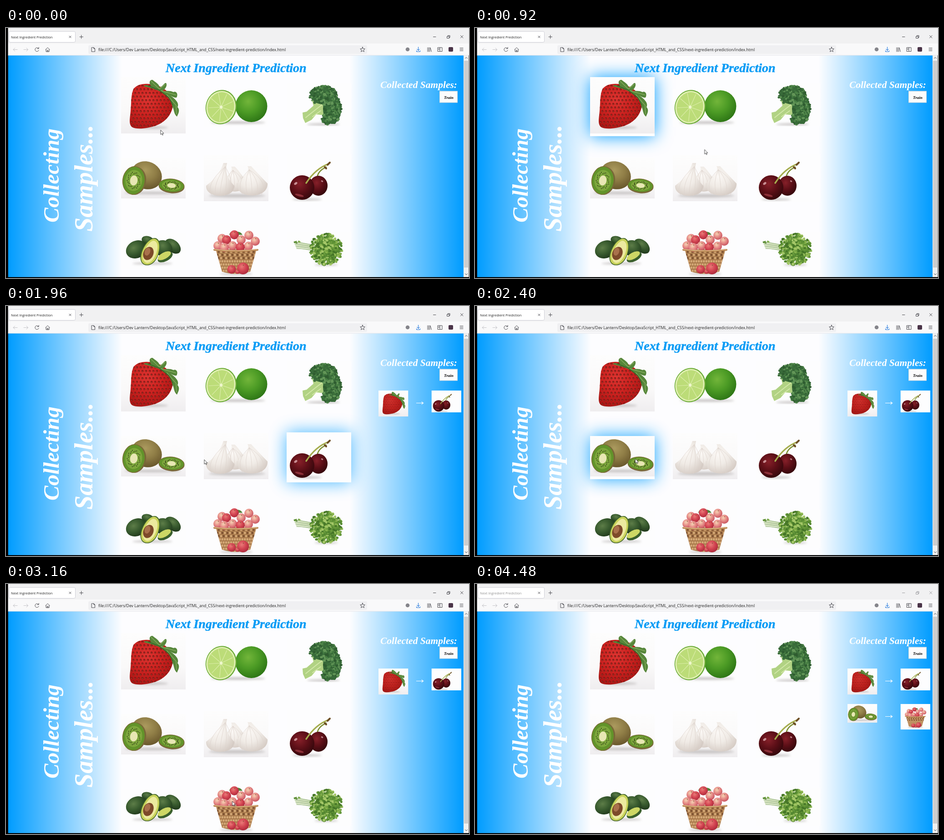
An HTML page that plays this animation: 1018x550 px, repeating every 4.52 s.

```html
<!DOCTYPE html>
<html lang="en">
<head>
<meta charset="utf-8">
<title>Next Ingredient Prediction</title>
<style>
  html, body { margin: 0; width: 100%; height: 100%; overflow: hidden; background: #000; }
  svg { display: block; }
  .ui { font-family: 'Open Sans', sans-serif; fill: #222; }
  .script { font: italic bold 28px 'Liberation Serif', serif; fill: #fff; }
  .icon { fill: none; stroke: #4a4a50; stroke-width: 1; stroke-linecap: round; stroke-linejoin: round; }
  .pale { stroke: #c4c4c8; }
</style>
</head>
<body>
<svg id="stage" width="1018" height="550" viewBox="0 0 1018 550"></svg>
<script>
const LOOP = 4520;
const stage = document.getElementById('stage');

let seed = 7;
const rand = () => (seed = (seed * 16807) % 2147483647) / 2147483647;
const repeat = (n, fn) => Array.from({ length: n }, (_, i) => fn(i)).join('');

const oval = (x, y, rx, ry, fill, turn = 0, more = '') =>
  `<ellipse cx="${x}" cy="${y}" rx="${rx}" ry="${ry}" fill="${fill}" transform="rotate(${turn} ${x} ${y})" ${more}/>`;
const shape = (d, fill, more = '') => `<path d="${d}" fill="${fill}" ${more}/>`;
const line = (d, color, width = 1) =>
  `<path d="${d}" fill="none" stroke="${color}" stroke-width="${width}" stroke-linecap="round"/>`;
const rect = (x, y, w, h, fill, more = '') =>
  `<rect x="${x}" y="${y}" width="${w}" height="${h}" fill="${fill}" ${more}/>`;
const shade = (id, ...colors) =>
  `<radialGradient id="${id}" cx=".4" cy=".35" r=".7">${colors.map((c, i) =>
    `<stop offset="${i / (colors.length - 1)}" stop-color="${c}"/>`).join('')}</radialGradient>`;

// Fills an ellipse with small random leaf clumps.
const clumps = (x, y, rx, ry, count, size, colors) => repeat(count, i => {
  const a = rand() * Math.PI * 2, d = Math.sqrt(rand());
  return oval((x + Math.cos(a) * d * rx).toFixed(1), (y + Math.sin(a) * d * ry).toFixed(1),
    (size * (.6 + rand() * .6)).toFixed(1), (size * (.5 + rand() * .5)).toFixed(1), colors[i % colors.length]);
});

const defs = `
  <linearGradient id="sky">
    <stop offset="0" stop-color="#009cff"/><stop offset=".25" stop-color="#fdfdff"/>
    <stop offset=".75" stop-color="#fdfdff"/><stop offset="1" stop-color="#009cff"/>
  </linearGradient>
  <linearGradient id="photo" x2="0" y2="1">
    <stop offset="0" stop-color="#fdfdfd"/><stop offset=".6" stop-color="#faf9f9"/><stop offset="1" stop-color="#efedef"/>
  </linearGradient>
  <filter id="blur" x="-60%" y="-80%" width="220%" height="260%"><feGaussianBlur stdDeviation="19"/></filter>
  <filter id="soft" x="-20%" y="-100%" width="140%" height="300%"><feGaussianBlur stdDeviation="2.5"/></filter>
  <clipPath id="view"><rect x="4.5" y="60" width="1001.5" height="488"/></clipPath>
  ${shade('red', '#dc3430', '#cb2320', '#a81614')}
  ${shade('lime', '#72b53a', '#4c9b25', '#2b7314')}
  ${shade('husk', '#ab9a5e', '#8f7d46', '#66542a')}
  ${shade('bulb', '#fbf8f5', '#f0ebe6', '#d5cbc4')}
  ${shade('cherryRed', '#862029', '#5c0f17', '#32070b')}
  ${shade('peel', '#5d7d48', '#385a2e', '#1d3419')}
  ${shade('apple', '#f6d3b4', '#e58a86', '#c44d5b')}
  ${shade('ripe', '#ea7a78', '#d34552', '#a92739')}`;

const shadow = (x, y, rx, ry) => oval(x, y, rx, ry, '#c9c6c6', 0, 'filter="url(#soft)"');

function strawberry() {
  const body = 'M281 133C291 122 309 120 331 126C350 132 365 146 367 164C368 188 351 207 329 215C311 221 288 224 277 218C269 211 273 197 274 182C276 163 274 147 281 133Z';
  const seeds = repeat(12, r => repeat(13, c => {
    const x = 276 + c * 8 + (r % 2) * 4, y = 127 + r * 8;
    return oval(x, y, 2.2, 2.3, '#7a1012') + oval(x - .3, y + .4, .9, 1, '#c4603c');
  }));
  return shadow(318, 219, 38, 3) + shape(body, 'url(#red)') +
    `<clipPath id="berry"><path d="${body}"/></clipPath><g clip-path="url(#berry)">${seeds}</g>` +
    shape('M303 128C306 123 312 127 319 128C313 120 316 114 322 114C328 119 337 123 338 131C346 127 348 120 352 121C356 128 348 136 344 139C354 138 364 138 368 141C375 138 379 146 375 153C369 154 363 149 360 148C372 155 382 166 377 174C384 181 378 190 376 195C368 189 370 178 366 174C364 163 358 152 346 145C335 135 320 133 303 128Z', '#56863a') +
    line('M319 117L337 134L350 124M341 138L373 147M354 147L374 170L375 189', '#86ad60', 1.4) +
    line('M312 127L336 136L358 153L367 170', '#315f24', 1.4);
}

function limes() {
  const wedges = repeat(9, i => {
    const a = i * Math.PI * 2 / 9 + .3;
    return line(`M473 174L${473 + Math.cos(a) * 27} ${174 + Math.sin(a) * 31}`, '#dcedaa', 1.2);
  });
  return shadow(510, 208, 60, 3) + oval(539.5, 172, 35, 35, 'url(#lime)') +
    oval(473, 174, 34, 38, '#69aa34', 15) + oval(472.5, 174, 32, 36, '#e0efb2', 15) +
    oval(472.5, 174, 29, 33, '#bcdc78', 15) + wedges + oval(473, 174, 3, 3.5, '#eef7cc');
}

function broccoli() {
  const greens = ['#2f5c30', '#4a8145', '#3b6e3b', '#639658', '#386a39'];
  return shadow(698, 212, 36, 2.5) +
    shape('M652 186L661 184L676 171L672 156L690 156L705 176L700 192L682 190L672 202L658 209L653 198Z', '#b1d283') +
    line('M659 197L684 177L696 168M674 195L692 182', '#d3e8a8', 2) +
    oval(699, 148, 30, 20, '#366839') + oval(717, 178, 20, 33, '#366839') +
    clumps(698, 148, 31, 21, 190, 3, greens) + clumps(718, 177, 19, 34, 200, 3, greens) +
    clumps(705, 200, 10, 12, 60, 3, greens);
}

const kiwiCut = (x, y, rx, ry, turn) => oval(x, y, rx, ry, '#7b6a35', turn) +
  oval(x, y, rx - 1.3, ry - 1.3, '#62932a', turn) + oval(x, y, rx * .74, ry * .74, '#7da63c', turn) +
  repeat(28, i => {
    const a = i * Math.PI / 14, d = .46 + (i % 3) * .06;
    return oval(x + Math.cos(a) * rx * d, y + Math.sin(a) * ry * d, .9, 1.1, '#2b3415');
  }) + oval(x, y, rx * .33, ry * .35, '#e8e7b4', turn);

const kiwis = () => shadow(322, 363, 62, 3) + oval(309, 324, 34.5, 30, 'url(#husk)', 25) +
  oval(284, 336, 24, 31, '#78663a', 8) + kiwiCut(281, 335.5, 25, 31.5, 8) +
  oval(364, 348.5, 28.5, 15, '#78663a', 5) + kiwiCut(364, 346.5, 28.5, 15, 5);

const bulb = (x, y, rx, ry, tx, ty) =>
  shape(`M${tx - 4} ${ty}Q${x - 2} ${y - ry} ${x - rx} ${y - 2}C${x - rx - 2} ${y + ry * 1.15} ${x + rx + 2} ${y + ry * 1.15} ${x + rx} ${y - 2}Q${x + 8} ${y - ry} ${tx + 4} ${ty}Z`, 'url(#bulb)') +
  repeat(5, i => line(`M${tx} ${ty + 8}Q${x + (i - 2) * rx * .55} ${y - 5} ${x + (i - 2) * rx * .3} ${y + ry * .8}`, '#ddd4cd', .8));

const garlic = () => shadow(508, 369, 62, 4) + bulb(503, 338, 24, 26, 499, 305) +
  bulb(471, 349, 31, 24, 482, 297) + bulb(541, 344, 34, 29, 535, 304);

const cherries = () => shadow(662, 377, 32, 2.5) +
  line('M684 332Q684 315 704 306', '#7e8f35', 2.6) + oval(687, 347, 20, 22, 'url(#cherryRed)') +
  oval(651, 351, 27, 27, 'url(#cherryRed)') + line('M660 341Q681 309 709 299', '#a5ad4e', 3.4) +
  line('M707 301L712 296M701 306L704 309', '#6d4e25', 4) +
  oval(637, 342, 4, 2.4, '#c98e93', -35) + oval(695, 337, 2.5, 1.8, '#b57a80', 30) + oval(645, 368, 10, 2.5, '#8c2f37', 15);

const avocados = () => shadow(322, 518, 44, 2.5) + oval(312, 467, 14, 9, 'url(#peel)', 15) +
  oval(367, 480, 20, 13, 'url(#peel)', 42) + oval(346, 485, 20, 18, 'url(#peel)', 25) +
  oval(287, 487, 24, 19, 'url(#peel)', -25) +
  oval(350, 504, 18, 9, '#3b602d', -28) + oval(348, 501, 16, 7, '#cdd765', -28) +
  shape('M327 462C339 463 341 480 336 495C332 512 321 523 309 522C296 521 293 507 297 493C303 477 315 461 327 462Z', '#47682c') +
  shape('M326 463.500C337 465 339 480 335 494C331 511 320 521 309 520.500C297 519 295 507 299 494C304 478 316 463 326 463.500Z', '#c9d35b') +
  shape('M325 468C334 470 335 482 331 494C327 507 318 518 310 517C301 515 299 505 303 494C308 481 317 468 325 468Z', '#ecea9f') +
  oval(313, 496, 11, 15, '#7d4a2a', 22) + oval(311, 492, 6, 9, '#a9714c', 22);

function apples() {
  const ball = (x, y, r, fill = 'url(#apple)') => oval(x, y, r, r, fill) + oval(x + 1, y - r * .55, 1.2, .8, '#71542c');
  const pile = [[475, 463], [502, 455], [534, 456], [548, 469], [466, 479], [485, 466], [517, 466], [533, 480], [498, 479], [515, 482], [480, 483]];
  const weave = repeat(8, r => repeat(18, c => rect(460 + c * 5.5 + (r % 2) * 2.7, 490 + r * 7, 4, 4.4,
    r < 3 && (r + c) % 2 ? '#7b5030' : '#d5aa78', 'rx="1"')));
  return shadow(506, 541, 36, 2.5) + shape('M491 455Q493 444 505 449Q515 446 520 455Z', '#56853b') +
    `<clipPath id="basket"><path d="M461 487H551L537 536Q505 546 475 536Z"/></clipPath>` +
    `<g clip-path="url(#basket)">${rect(455, 484, 104, 64, '#ab7c4e')}${weave}</g>` +
    pile.map(([x, y], i) => ball(x, y, 10, i % 4 === 1 ? 'url(#ripe)' : undefined)).join('') +
    line('M458 488Q505 494 553 488', '#b5824f', 4) + line('M458 487Q505 493 553 487', '#debb8a', 1.5) +
    ball(496, 531, 9.5, 'url(#ripe)') + ball(521, 529, 13, 'url(#ripe)') + ball(509, 536, 5, 'url(#ripe)');
}

function parsley() {
  const greens = ['#568a32', '#87b24c', '#689a3b', '#a4c768', '#467628'];
  return shadow(704, 521, 26, 2) + repeat(7, i => line(`M${633 + i} ${470 + i * 2.5}Q660 ${474 + i * 2} 692 ${481 + i * 2}`, i % 2 ? '#9fbe6b' : '#6d9846', 1.1)) +
    clumps(640, 471, 8, 2.5, 12, 1.8, greens) + oval(706, 487, 28, 25, '#5d9035') +
    clumps(704, 487, 35, 35, 360, 3.2, greens);
}

const items = {
  strawberry: { x: 253, y: 108, h: 124, draw: strawberry, photo: true },
  limes: { x: 435, y: 134, h: 84, draw: limes },
  broccoli: { x: 617, y: 122, h: 94, draw: broccoli },
  kiwis: { x: 253, y: 286, h: 89, draw: kiwis, photo: true },
  garlic: { x: 435, y: 279, h: 102, draw: garlic, photo: true },
  cherries: { x: 617, y: 278, h: 104, draw: cherries },
  avocados: { x: 253, y: 450, h: 80, draw: avocados },
  apples: { x: 435, y: 429, h: 122, draw: apples },
  parsley: { x: 617, y: 448, h: 84, draw: parsley }
};
const symbols = Object.entries(items).map(([id, { x, y, h, draw, photo }]) =>
  `<symbol id="${id}" viewBox="${x} ${y} 142 ${h}">${rect(x, y, 142, h, photo ? 'url(#photo)' : '#fdfdfe')}${draw()}</symbol>`).join('');
const picture = (id, x = items[id].x, y = items[id].y, w = 142) =>
  `<use href="#${id}" x="${x}" y="${y}" width="${w}" height="${items[id].h * w / 142}"/>`;

const glow = id => {
  const { x, y, h } = items[id];
  return `<g id="glow-${id}" opacity="0">${rect(x, y, 142, h + 6, '#009cff', 'filter="url(#blur)"')}${rect(x, y, 142, h + 6, '#fefefe')}</g>`;
};
const sample = (id, from, to, y) => `<g id="${id}" opacity="0">${picture(from, 819, y, 65.5)}${picture(to, 935.5, y, 65.5)}
  ${line(`M902.5 ${y + 27.5}H917M914 ${y + 25}L917.5 ${y + 27.5}L914 ${y + 30}`, '#fff', 1.2)}</g>`;

const chrome = `
  ${rect(4.5, 0, 1013.5, 34, '#f1f1f2')}${rect(4.5, 34, 1013.5, 26, '#f9f9fa')}
  ${rect(6.5, 7.5, 146, 24, '#fff', 'rx="3" stroke="#cfcfd6"')}
  ${rect(181, 38, 613, 19, '#f0f0f2', 'rx="3"')}
  <g id="title-bar">
    <text class="ui" x="11" y="22.5" font-size="7.5">Next Ingredient Prediction</text>
    <path class="icon" d="M939.5 19.5H945M970 18.5H974.500V22.500H970ZM971.500 18V16.500H976V21H975M999.500 16.500L1005 22M1005 16.500L999.500 22"/>
  </g>
  <path class="icon" d="M139 17.500L143 21.500M143 17.500L139 21.500M162 19.500H169.500M165.700 15.700V23.200"/>
  <path class="icon pale" d="M25 47.500H16M19.500 44L16 47.500L19.500 51M39 47.500H48.500M45 44L48.500 47.500L45 51"/>
  <path class="icon" d="M71.500 45A4.200 4.200 0 1 0 72 49M72 42.500V45.500H69M87 47.500L91.500 43L96 47.500M88 47V52H95V47M90.500 52V49H92.500V52"/>
  <path class="icon" d="M188.500 43H193L195.500 45.500V52H188.500ZM193 43V45.500H195.500"/>
  <path class="icon" d="M784 42L785.500 45.600L789.300 45.900L786.400 48.400L787.300 52.200L784 50.100L780.700 52.200L781.600 48.400L778.700 45.900L782.500 45.600Z"/>
  <text class="ui" x="203" y="51" font-size="8.73">file:///C:/Users/Dev Lantern/Desktop/JavaScript_HTML_and_CSS/next-ingredient-prediction/index.html</text>
  ${oval(883, 47, 4.3, 4.3, '#85858b')}
  <path class="icon" style="stroke:#0a69d8" d="M906.500 42V49.500M903.500 46.500L906.500 49.500L909.500 46.500M902.500 50V52H910.500V50"/>
  <path class="icon" d="M927 43V52M929.500 43V52M932 43V52M933 43.500L935.500 52M949.500 43H959V51.500H949.500ZM954 43V51.500M951 45.500H952.500M951 47.500H952.500M998 44H1005M998 47H1005M998 50H1005"/>
  ${rect(973, 42, 10, 10, '#4a3448', 'rx="2"')}
  ${rect(1006, 60, 11.5, 488, '#f0f0f0')}${rect(1007, 72, 10.5, 455, '#cdcdcd')}
  <path class="icon" d="M1009.500 67L1012 64.500L1014.500 67M1009.500 540.500L1012 543L1014.500 540.500"/>`;

stage.innerHTML = `<defs>${defs}${symbols}</defs>
  ${chrome}
  <g clip-path="url(#view)">
    ${rect(4.5, 60, 1001.5, 488, 'url(#sky)')}
    ${['strawberry', 'cherries', 'kiwis', 'apples'].map(glow).join('')}
    ${Object.keys(items).map(id => picture(id)).join('')}
    <text class="script" x="351" y="96.500" style="fill:#0a9cf5;stroke:#0a9cf5;stroke-width:.5">Next Ingredient Prediction</text>
    <text class="script" transform="translate(116 428) rotate(-90)" style="font-size:49px">Collecting</text>
    <text class="script" transform="translate(190 448) rotate(-90)" style="font-size:56px">Samples...</text>
    <text class="script" x="823" y="131.500" style="font-size:21.5px">Collected Samples:</text>
    ${rect(953.5, 139, 39, 25, '#fcfcfc', 'stroke="#cfd6dc"')}
    <text class="script" x="963" y="155.500" style="font-size:9px;fill:#000">Train</text>
    ${sample('first', 'strawberry', 'cherries', 186)}
    ${sample('second', 'kiwis', 'apples', 264)}
  </g>
  ${rect(4.5, 59.5, 1013, 1, '#e6e6ea')}
  <g id="cursor"><path d="M0 0V10L2.300 7.900L4 11.300L5.400 10.600L3.800 7.300H7Z" fill="#fff" stroke="#222" stroke-width=".8"/></g>`;

// Each step is [time, value, easing to the next step].
function play(id, prop, steps) {
  const frames = steps.map(([t, value, easing = 'linear']) => ({ offset: t / LOOP, [prop]: value, easing }));
  frames.push({ offset: 1, [prop]: steps[steps.length - 1][1] });
  document.getElementById(id).animate(frames, { duration: LOOP, iterations: Infinity });
}
const HOLD = 'steps(1, end)';

const clicks = { strawberry: 400, cherries: 1310, kiwis: 2280, apples: 3300 };
for (const [id, t] of Object.entries(clicks)) {
  play('glow-' + id, 'opacity', [[0, 0], [t, 0], [t + 130, 1], [t + 600, 1], [t + 800, 0]]);
}
play('first', 'opacity', [[0, 0, HOLD], [clicks.cherries, 1]]);
play('second', 'opacity', [[0, 0, HOLD], [clicks.apples, 1]]);
play('title-bar', 'opacity', [[0, 1, HOLD], [4400, .5]]);

const at = (x, y) => `translate(${x}px, ${y}px)`;
play('cursor', 'transform', [
  [0, at(340, 224.5)], [560, at(340, 224.5), 'ease-in'],
  [920, at(504, 267), 'ease-out'], [1260, at(645, 343)], [1520, at(645, 343), 'ease-in-out'],
  [2220, at(352.5, 336)], [2540, at(352.5, 336), 'ease-in-out'],
  [3100, at(497.5, 478)], [3440, at(497.5, 478), 'ease-in-out'],
  [3880, at(556, 114.5), 'ease-in'], [4300, at(600, -14)]
]);
</script>
</body>
</html>
```
